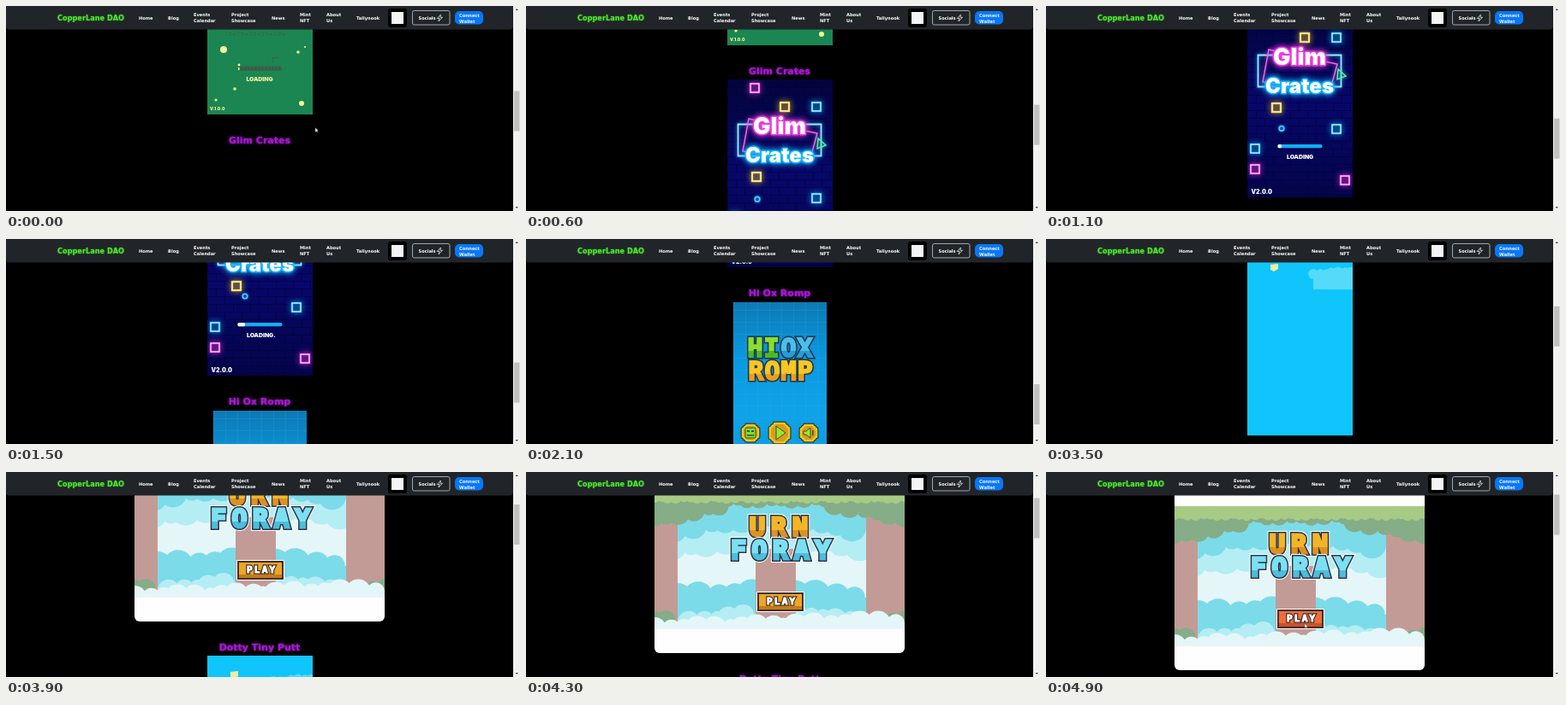
An HTML page with a canvas for the animation above (5000 ms loop, 600 px wide and 240 px high).

```html
<!DOCTYPE html>
<html lang="en">
<head>
<meta charset="utf-8">
<title>Game gallery</title>
<style>
html, body { margin: 0; width: 100%; height: 100%; overflow: hidden; background: #000; }
canvas { display: block; width: 600px; height: 240px; }
</style>
</head>
<body>
<canvas id="stage" width="600" height="240"></canvas>
<script>
const ctx = document.getElementById('stage').getContext('2d');
const LOOP = 5000, STEP = 100;
const WIDE = '"DejaVu Sans", sans-serif';
const HEAVY = 'Inter, sans-serif';
const BLOCK = '"DejaVu Sans Mono", monospace';

// [time, page offset]
const scrollPath = [[0, 364], [600, 445], [1500, 590], [2100, 717], [2200, 728], [2400, 728],
  [3100, 465], [3900, 57], [4200, 26], [4600, 0], [5000, 0]];
const loadPath = [[0, 270], [600, 270], [1500, 279], [3100, 288], [5000, 299]];

function along(path, t) {
  const i = Math.max(1, path.findIndex(p => p[0] >= t));
  const [t0, a] = path[i - 1], [t1, b] = path[i];
  return a + (b - a) * (t - t0) / (t1 - t0);
}

function rect(x, y, w, h, color) {
  ctx.fillStyle = color;
  ctx.fillRect(x, y, w, h);
}

function rounded(x, y, w, h, r, fill, stroke) {
  ctx.beginPath();
  ctx.roundRect(x, y, w, h, r);
  if (fill) { ctx.fillStyle = fill; ctx.fill(); }
  if (stroke) { ctx.strokeStyle = stroke; ctx.lineWidth = 1; ctx.stroke(); }
}

function disc(x, y, r, color) {
  ctx.fillStyle = color;
  ctx.beginPath();
  ctx.arc(x, y, r, 0, 7);
  ctx.fill();
}

function poly(points, fill, stroke, width = 1) {
  ctx.beginPath();
  points.forEach(([x, y]) => ctx.lineTo(x, y));
  ctx.closePath();
  if (fill) { ctx.fillStyle = fill; ctx.fill(); }
  if (stroke) { ctx.strokeStyle = stroke; ctx.lineWidth = width; ctx.stroke(); }
}

function text(str, x, y, font, color, align = 'left') {
  ctx.font = font;
  ctx.textAlign = align;
  ctx.fillStyle = color;
  ctx.fillText(str, x, y);
}

function glow(color, blur, draw) {
  ctx.save();
  ctx.shadowColor = color;
  ctx.shadowBlur = blur;
  draw();
  ctx.restore();
}

function clipped(x, y, w, h, draw) {
  ctx.save();
  ctx.beginPath();
  ctx.rect(x, y, w, h);
  ctx.clip();
  draw();
  ctx.restore();
}

function fade(y0, y1, ...colors) {
  const g = ctx.createLinearGradient(0, y0, 0, y1);
  colors.forEach((c, i) => g.addColorStop(i / (colors.length - 1), c));
  return g;
}

function cursor(x, y) {
  poly([[x, y], [x, y + 5], [x + 1.2, y + 4], [x + 2, y + 5.6], [x + 2.8, y + 5.2],
    [x + 2.1, y + 3.7], [x + 3.6, y + 3.6]], '#fff', '#444', 0.4);
}

// Lumpy edge running from y0 to y1, filled towards the given limit
function clouds(x0, x1, y0, y1, limit, color, size, seed) {
  poly([[x0, y0], [x1, y1], [x1, limit], [x0, limit]], color);
  for (let x = x0, i = seed; x <= x1; i++) {
    const r = size * (0.7 + 0.5 * Math.abs(Math.sin(i * 2.3)));
    disc(x, y0 + (y1 - y0) * (x - x0) / (x1 - x0), r, color);
    x += r * 1.4;
  }
}

function blockText(str, x, y, size, spacing, top, bottom, outline, weight) {
  ctx.save();
  ctx.font = `bold ${size}px ${BLOCK}`;
  ctx.letterSpacing = spacing + 'px';
  ctx.textAlign = 'left';
  ctx.lineJoin = 'miter';
  ctx.miterLimit = 3;
  for (const [color, width] of outline) {
    ctx.strokeStyle = color;
    ctx.lineWidth = width;
    ctx.strokeText(str, x, y);
  }
  const split = ctx.createLinearGradient(0, y - size * 0.73, 0, y);
  [[0, top], [0.68, top], [0.7, bottom], [1, bottom]].forEach(s => split.addColorStop(...s));
  ctx.fillStyle = split;
  ctx.fillText(str, x, y);
  ctx.lineWidth = weight;
  ctx.strokeStyle = split;
  ctx.strokeText(str, x, y);
  ctx.restore();
}

function heading(str, y) {
  glow('#b41de0', 3, () => text(str, 296, y + 4, `bold 11px ${WIDE}`, '#a81ad2', 'center'));
}

function drawForay(hover) {
  const sky = '#7bdbe9', haze = '#b5edf4', mist = '#e5f6f8';
  const bark = '#c39b96', leaf = '#85ad87', light = '#a7cb84';
  rounded(150, 12, 292, 220, 6, '#fefefe');
  clipped(150, 40, 292, 164, () => {
    rect(150, 40, 292, 164, mist);
    clouds(172, 284, 108, 92, 40, haze, 15, 3);
    clouds(284, 402, 92, 108, 40, haze, 15, 8);
    clouds(172, 284, 86, 70, 40, sky, 14, 9);
    clouds(284, 402, 70, 88, 40, sky, 14, 4);
    clouds(177, 268, 167, 163, 204, sky, 15, 5);
    clouds(315, 397, 163, 167, 204, sky, 15, 1);
    clouds(190, 268, 196, 186, 204, haze, 11, 2);
    clouds(315, 385, 186, 196, 204, haze, 11, 6);
    rect(268, 110, 47, 94, bark);
    rect(150, 50, 27, 154, bark);
    rect(397, 50, 45, 154, bark);
    clouds(150, 235, 74, 58, 40, leaf, 11, 7);
    clouds(235, 360, 52, 52, 40, leaf, 9, 3);
    clouds(360, 442, 58, 72, 40, leaf, 11, 5);
    rect(150, 40, 292, 14, light);
    clouds(150, 442, 50, 50, 40, light, 6, 3);
    clouds(150, 176, 192, 196, 204, leaf, 10, 8);
    clouds(428, 442, 194, 190, 204, leaf, 8, 2);
    clouds(150, 300, 204, 200, 204, mist, 12, 6);
    clouds(300, 442, 201, 196, 204, mist, 13, 4);
  });
  const edge = [['#fff', 8], ['#2b3448', 6]];
  blockText('URN', 261, 95, 30, 7, '#f3b528', '#dd9220', edge, 3);
  blockText('FORAY', 239, 122, 30, 6.5, '#7be1f2', '#4dbddb', edge, 3);
  rect(269, 160, 56, 24, '#fff');
  rect(270, 161, 54, 22, '#40302c');
  rect(272, 163, 50, 18, hover ? '#ee6c3b' : '#eda624');
  rect(272, 177, 50, 4, hover ? '#cf4f2b' : '#c77b18');
  blockText('PLAY', 281, 175, 11, 2.2, '#fff', '#fff', [['#40302c', 3.4]], 1);
}

function drawPutt(t) {
  clipped(235, 272, 123, 219, () => {
    if (t >= 2500) {
      rect(235, 272, 123, 219, '#0fc5fb');
      poly([[262, 291], [271, 290], [271, 296], [266, 299], [262, 297]], '#f0eda0');
      clouds(312, 358, 302, 298, 320, '#55dafa', 5, 2);
      return;
    }
    rect(235, 272, 123, 219, '#1b8651');
    for (let i = 0; i < 15; i++) {
      rect(255 + i * 4.8, 394 + i % 3, 3.5, 1.2, '#356c4c');
      rect(256 + i * 4.8, 397, 2, 1.5, '#356c4c');
    }
    [[254, 415, 4], [341, 418, 1.8], [349, 412, 1], [272, 433, 1.4], [267, 461, 1.8],
      [245, 474, 1.6], [345, 478, 3]].forEach(d => disc(...d, '#f8f496'));
    rect(311, 424, 1, 7, '#3e604c');
    rect(312, 424, 6, 1, '#3e604c');
    rounded(272, 434.5, 50, 5, 2, '#3e604c');
    for (let x = 275; x < 322; x += 4) rect(x, 436, 1, 3, '#245e40');
    rect(271, 436, 1.5, 3, '#f8f496');
    text('LOADING', 296, 452.3, `900 6.8px ${HEAVY}`, '#f8f4a4', 'center');
    text('V.1.0.0', 238, 486.3, `900 5px ${HEAVY}`, '#f8f496');
  });
}

function neonSquare(x, y, color) {
  glow(color, 7, () => {
    ctx.strokeStyle = color;
    ctx.lineWidth = 2.4;
    ctx.strokeRect(x - 5, y - 5, 10, 10);
    ctx.shadowBlur = 0;
    ctx.strokeStyle = '#fff';
    ctx.lineWidth = 0.9;
    ctx.strokeRect(x - 5, y - 5, 10, 10);
  });
}

function drawCrates(t) {
  const pink = '#f33be0', cyan = '#13b5ff', yellow = '#f8ce25';
  clipped(235, 531, 123, 219, () => {
    rect(235, 531, 123, 219, fade(531, 750, '#03043c', '#07076b', '#04044a'));
    for (let row = 0; row < 25; row++) {
      const y = 531 + row * 9;
      rect(235, y, 123, 0.7, '#02033a');
      for (let x = 235 + row % 2 * 10; x < 358; x += 20) rect(x, y, 0.7, 9, '#02033a');
    }
    [[267, 541, pink], [302, 563, yellow], [339, 563, cyan], [269, 645, yellow], [339, 670, cyan],
      [244, 693, cyan], [244, 717, pink], [349, 730, pink]].forEach(s => neonSquare(...s));

    glow(cyan, 5, () => poly([[247.5, 583.5], [344.5, 583.5], [344.5, 620.5], [247.5, 620.5]], null, '#a6e6ff', 1.8));
    glow(pink, 4, () => poly([[260, 577], [340, 594], [331, 627], [253, 615]], null, '#f06ee8', 1.4));
    glow('#24e88a', 4, () => poly([[341, 600], [350, 608], [340, 612]], null, '#62efae', 1.4));
    for (const [str, y, size, color] of [['Glim', 595, 27, pink], ['Crates', 628, 24, cyan]]) {
      glow(color, 7, () => {
        ctx.font = `900 ${size}px ${HEAVY}`;
        ctx.textAlign = 'center';
        ctx.lineJoin = 'round';
        ctx.lineWidth = 3;
        ctx.strokeStyle = color;
        ctx.strokeText(str, 296, y);
        text(str, 296, y, ctx.font, '#fff', 'center');
      });
    }

    const x = along(loadPath, t);
    const y = 677 - 20 * Math.abs(Math.sin(Math.PI * (t - 3100) / 640));
    glow(cyan, 3, () => {
      ctx.beginPath();
      ctx.arc(x, y, 2.8, 0, 7);
      ctx.strokeStyle = '#4bcaff';
      ctx.lineWidth = 1.6;
      ctx.stroke();
    });
    rounded(270.5, 688, 52, 4.2, 2, '#10aef5');
    rounded(270.5, 688, Math.max(1, x - 270.5), 4.2, 1.5, '#fff');
    const dots = '.'.repeat(Math.floor((t + 100) / 300) % 4);
    text('LOADING' + dots, 281, 705, `900 6.8px ${HEAVY}`, '#fff');
    text('V2.0.0', 239.5, 745.5, `900 7px ${HEAVY}`, '#fff');
  });
}

function rompButton(x, y, r) {
  const cross = (s, color) => {
    rounded(x - s, y - s * 0.6, s * 2, s * 1.2, 2, color);
    rounded(x - s * 0.6, y - s, s * 1.2, s * 2, 2, color);
    rounded(x - s * 0.8, y - s * 0.8, s * 1.6, s * 1.6, 2, color);
  };
  cross(r, '#243c35');
  cross(r - 1.2, '#f2c51e');
  cross(r - 3.5, '#d99c1c');
}

function drawRomp() {
  clipped(242, 791, 109, 194, () => {
    rect(242, 791, 109, 194, fade(791, 985, '#0d79b5', '#0b98df', '#10a2e8', '#0c98dc'));
    for (let i = 0; i < 15; i++) {
      rect(242 + i * 14, 791, 0.7, 194, '#2bade755');
      rect(242, 800 + i * 14, 109, 0.7, '#2bade755');
    }
    const edge = [['#17384e', 5]];
    blockText('HI', 258.5, 855, 30, 1, '#8ade2c', '#4eb82c', edge, 2);
    blockText('OX', 297.5, 855, 30, 1, '#4cbdea', '#289bd4', edge, 2);
    blockText('ROMP', 259.5, 882, 30, 1, '#f9c522', '#ee9d18', edge, 2);
    rompButton(262, 944, 11.5);
    rompButton(296, 944, 13.5);
    rompButton(330, 944, 11.5);
    rounded(256, 938, 12, 12, 1, '#87d832', '#31562a');
    rect(258, 941, 3, 2, '#31562a');
    rect(263, 941, 3, 2, '#31562a');
    rect(258, 946, 8, 1.5, '#31562a');
    poly([[292, 936], [303, 944], [292, 952]], '#9be632', '#31562a');
    poly([[324, 942], [327, 942], [332, 938], [332, 950], [327, 946], [324, 946]], '#9be632', '#31562a');
    rect(334, 941, 1.5, 6, '#31562a');
  });
}

function drawNav() {
  rounded(0, 0, 592, 27.5, [0, 0, 4, 4], '#212529');
  glow('#2fae20', 1.5, () => text('CopperLane DAO', 60, 16.6, `bold 8.2px ${WIDE}`, '#50e52f'));
  const font = `bold 5.1px ${WIDE}`;
  [['Home', 155], ['Blog', 189], ['Events|Calendar', 219], ['Project|Showcase', 263], ['News', 310],
    ['Mint|NFT', 343], ['About|Us', 374], ['Tallynook', 409]].forEach(([label, x]) => {
    const lines = label.split('|');
    lines.forEach((line, i) => text(line, x, lines.length > 1 ? 11.7 + i * 7.6 : 15.6, font, '#fff'));
  });
  rounded(446, 3, 22, 22, 3, '#000');
  rect(450, 7, 14, 14, '#f4f4f4');
  rounded(474.5, 5.5, 43.5, 16.5, 2, null, '#a5a8aa');
  text('Socials', 481.5, 15.6, font, '#fff');
  poly([[507.5, 10], [503.2, 14.5], [506, 14.5], [505, 18], [509.5, 13.2], [506.7, 13.2]], null, '#fff', 0.7);
  rounded(524, 6, 33, 15.5, 5, '#0877f9');
  const bold = 'bold 5.8px "Open Sans", sans-serif';
  text('Connect', 529, 13, bold, '#fff');
  text('Wallet', 529, 20, bold, '#fff');
}

function drawScrollbar(offset) {
  rect(592, 0, 8, 240, '#f1f1f1');
  rect(593, 26.6 + offset * 0.2, 6.5, 47, '#c1c1c1');
  poly([[594.5, 5], [596.2, 3], [598, 5]], '#505050');
  poly([[594.5, 235], [596.2, 237], [598, 235]], '#505050');
}

function render(t) {
  const offset = along(scrollPath, t);
  rect(0, 0, 600, 240, '#000');
  ctx.save();
  ctx.translate(0, -Math.round(offset));
  drawForay(t >= 4800);
  heading('Dotty Tiny Putt', 262);
  drawPutt(t);
  heading('Glim Crates', 521);
  if (t >= 300) drawCrates(t); // appears once it has loaded
  heading('Hi Ox Romp', 780);
  drawRomp();
  ctx.restore();
  drawNav();
  drawScrollbar(offset);
  if (t < 100) cursor(361, 142.5);
  if (t >= 4800) cursor(302, 177.5);
}

const start = performance.now();
function tick() {
  const t = (performance.now() - start) % LOOP;
  render(Math.floor(t / STEP) * STEP);
  requestAnimationFrame(tick);
}
tick();
</script>
</body>
</html>
```
